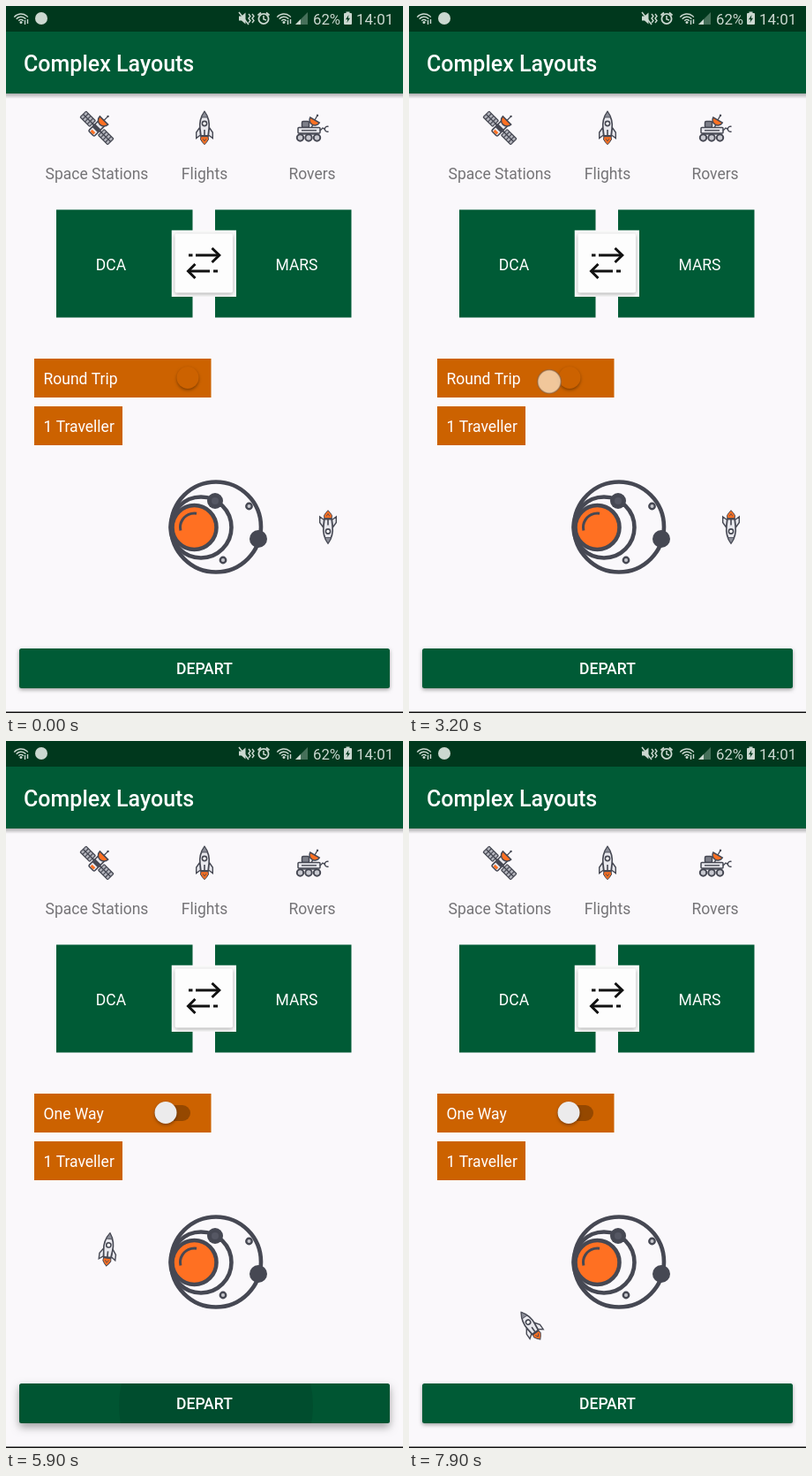
These frames come from a looping animation (450x800 px, 8000 ms). An HTML page with a canvas:

```html
<!DOCTYPE html>
<html lang="en">
<head>
<meta charset="utf-8">
<title>Complex Layouts</title>
<style>
html, body { margin: 0; width: 100%; height: 100%; overflow: hidden; background: #faf8fb; }
canvas { display: block; width: 100vw; height: 100vh; }
</style>
</head>
<body>
<canvas id="stage"></canvas>
<script>
const W = 450, H = 800, LOOP = 8000, STEP = 100;
const BG = '#faf8fb', GREEN = '#005b36', ORANGE = '#cc6200';
const INK = '#464853', FIRE = '#ff7022', PALE = '#e9e9ee', STATUS = '#cbd8d0';
const FONT = 'Roboto, sans-serif';

const canvas = document.getElementById('stage');
const g = canvas.getContext('2d');
let scale = 1;

// Each trip: button down, launch time, duration, start angle and sweep in degrees.
const trips = [
  { press: 490, go: 656, dur: 1967, from: 0, sweep: 360 },
  { press: 4170, go: 4246, dur: 1000, from: 0, sweep: 180 },
  { press: 5780, go: 5864, dur: 1000, from: 180, sweep: 180 },
  { press: 6970, go: 7096, dur: 1000, from: 0, sweep: 180 }
];
// Finger and thumb while the switch is dragged.
const drag = [
  { x: 212, y: 428, thumb: 206 },
  { x: 188, y: 427, thumb: 186 },
  { x: 159, y: 425, thumb: 182 }
];
const DRAG_START = 3000, DRAG_END = 3300;

const clamp = v => Math.max(0, Math.min(1, v));
const mix = (a, b, k) => `rgb(${a.map((v, i) => Math.round(v + (b[i] - v) * k)).join(',')})`;

function rect(x, y, w, h, color, r = 0) {
  g.fillStyle = color;
  g.beginPath();
  g.roundRect(x, y, w, h, r);
  g.fill();
}

function line(color, width, ...pts) {
  g.strokeStyle = color;
  g.lineWidth = width;
  g.beginPath();
  for (let i = 0; i < pts.length; i += 2) g.lineTo(pts[i], pts[i + 1]);
  g.stroke();
}

function disc(x, y, r, fill, stroke, width) {
  g.beginPath();
  g.arc(x, y, r, 0, Math.PI * 2);
  if (fill) { g.fillStyle = fill; g.fill(); }
  if (stroke) { g.strokeStyle = stroke; g.lineWidth = width; g.stroke(); }
}

function shape(d, fill, width) {
  const p = new Path2D(d);
  if (fill) { g.fillStyle = fill; g.fill(p); }
  if (width) { g.strokeStyle = INK; g.lineWidth = width; g.stroke(p); }
}

function text(str, x, y, size, color, align = 'left', weight = 400) {
  g.font = `${weight} ${size}px ${FONT}`;
  g.textAlign = align;
  g.fillStyle = color;
  g.fillText(str, x, y);
}

function at(x, y, deg, draw) {
  g.save();
  g.translate(x, y);
  g.rotate(deg * Math.PI / 180);
  draw();
  g.restore();
}

function shadowed(dy, blur, alpha, draw) {
  g.save();
  g.shadowColor = `rgba(0,0,0,${alpha})`;
  g.shadowOffsetY = dy * scale;
  g.shadowBlur = blur * scale;
  draw();
  g.restore();
}

function rocket(x, y, deg) {
  at(x, y, deg, () => {
    shape('M-4 9 L-4.5 13 L-2.5 16 L0 18.8 L2.5 16 L4.5 13 L4 9Z', FIRE, 1);
    shape('M-2 12 L0 15 L2 12', null, 0.8);
    shape('M-5 -1 L-9.3 5 L-9.3 11.5 L-4.5 8Z M5 -1 L9.3 5 L9.3 11.5 L4.5 8Z', PALE, 1.4);
    shape('M0 -18.5 C-4 -13 -6 -6 -5 1 L-4 9.5 H4 L5 1 C6 -6 4 -13 0 -18.5Z', PALE, 1.6);
    shape('M0 -18.5 C-1.6 -16 -2.7 -14 -3.5 -12 H3.5 C2.7 -14 1.6 -16 0 -18.5Z', '#8b8d97', 0.8);
    disc(0, -5, 2.6, '#fff', INK, 1.6);
    line(INK, 1.6, 0, 2, 0, 9);
    line(INK, 2, -4, 9, 4, 9);
  });
}

function dish(x, y, deg, r) {
  at(x, y, deg, () => {
    line(INK, 1.3, 0, 0, 0, -r);
    shape(`M${-r} 0 A${r} ${r} 0 0 0 ${r} 0Z`, FIRE, 1.5);
    disc(0, -r, 1.2, INK);
  });
}

function satellite() {
  at(103, 138, 45, () => {
    for (const x of [-22, 7]) {
      rect(x, -4.7, 15, 9.4, '#b4b5bd');
      for (let i = 0; i <= 4; i++) line(INK, 1.2, x + i * 3.75, -4.7, x + i * 3.75, 4.7);
      for (let i = -1; i <= 1; i++) line(INK, 1.3, x, i * 4.7, x + 15, i * 4.7);
    }
    line(INK, 2, -8, 0, 8, 0);
    rect(-4.5, -8, 9, 17, PALE, 1.5);
    g.strokeStyle = INK;
    g.lineWidth = 1.6;
    g.stroke();
    rect(-4.5, -2, 9, 5, INK);
    rect(-2.5, 5, 5, 3, FIRE);
  });
  dish(111, 129.5, 45, 6.5);
}

function rover() {
  line(INK, 1.5, 346, 138, 349, 132);
  dish(350, 129, 30, 6);
  rect(335.5, 130.5, 8, 7, '#7d7f89', 1.5);
  g.strokeStyle = INK;
  g.lineWidth = 1.5;
  g.stroke();
  rect(331, 137.5, 25, 6.5, PALE, 1);
  g.stroke();
  line(INK, 1.4, 335, 140.8, 352, 140.8);
  line(INK, 1.4, 356, 141, 359, 138, 362, 139.5);
  shape('M365.5 136.5 A3 3 0 1 0 365.5 142', null, 1.4);
  for (const x of [333.5, 343, 352.5]) disc(x, 149, 3.7, '#c9cad1', INK, 2);
  line(INK, 1.4, 333, 145, 353, 145);
}

function wifi(x) {
  for (const r of [3.5, 6.8, 10]) {
    g.strokeStyle = STATUS;
    g.lineWidth = 1.5;
    g.beginPath();
    g.arc(x, 19, r, -Math.PI * 0.78, -Math.PI * 0.22);
    g.stroke();
  }
  disc(x, 18.6, 1.5, STATUS);
  line(STATUS, 1.4, x + 4.5, 16, x + 4.5, 21);
  line(STATUS, 1.4, x + 7.5, 15, x + 7.5, 20);
}

function statusBar() {
  rect(0, 0, W, 29, '#00381d');
  wifi(17);
  disc(40, 14, 7, STATUS);

  shape('M264 11.5 H267 L271.5 7.5 V20.5 L267 16.5 H264Z', STATUS);
  line(STATUS, 1.5, 264, 7, 275, 21);
  line(STATUS, 1.4, 275, 9, 277, 11.5, 275, 14, 277, 16.5, 275, 19);
  line(STATUS, 1.4, 279, 9, 281, 11.5, 279, 14, 281, 16.5, 279, 19);

  disc(292, 14.5, 5.6, null, STATUS, 1.8);
  line(STATUS, 1.5, 292, 11, 292, 15, 295, 16);
  line(STATUS, 1.8, 285.5, 10.5, 289, 7.5);
  line(STATUS, 1.8, 295, 7.5, 298.5, 10.5);

  wifi(315);
  shape('M328 21 H342 V7Z', '#46705a');
  shape('M328 21 H334 V15Z', STATUS);
  text('62%', 348, 20.5, 16.8, STATUS);
  rect(385.5, 6.5, 4, 2, STATUS);
  rect(383, 8, 9, 13, STATUS, 1);
  shape('M388.5 10 L385 15.3 H387.3 L386.3 19 L390 13.7 H387.7Z', '#00381d');
  text('14:01', 397, 20.5, 17, STATUS);
}

function header() {
  const fade = g.createLinearGradient(0, 99, 0, 105);
  fade.addColorStop(0, 'rgba(0,0,0,0.3)');
  fade.addColorStop(1, 'rgba(0,0,0,0)');
  rect(0, 99, W, 6, fade);
  rect(0, 29, W, 70, GREEN);
  statusBar();
  text('Complex Layouts', 20, 74, 25, '#fff', 'left', 500);
}

function tabs() {
  satellite();
  rocket(225, 138, 0);
  rover();
  ['Space Stations', 'Flights', 'Rovers'].forEach((name, i) =>
    text(name, 103 + i * 122, 195.5, 17.5, '#757477', 'center'));
}

function route() {
  rect(57, 230.5, 154.5, 122, GREEN);
  rect(237, 230.5, 154.5, 122, GREEN);
  text('DCA', 119, 298.5, 17.5, '#fff', 'center');
  text('MARS', 329.5, 298.5, 17.5, '#fff', 'center');

  g.save();
  g.beginPath();
  g.rect(187.5, 253.5, 73.5, 75.5);
  g.clip();
  rect(187.5, 253.5, 73.5, 75.5, '#fafafa');
  shadowed(1.5, 4, 0.3, () => rect(191.5, 257.5, 65.5, 67, '#fdfdfd', 2));
  g.restore();

  const black = '#111';
  line(black, 3, 207, 282, 211.5, 282);
  line(black, 3, 215, 282, 241, 282);
  line(black, 3, 233.5, 274, 241.8, 282, 233.5, 290);
  line(black, 3, 207, 300, 231, 300);
  line(black, 3, 235, 300, 240, 300);
  line(black, 3, 214.5, 292, 206.5, 300, 214.5, 308);
}

function touch(x, y) {
  disc(x, y, 13.2, 'rgba(255,238,215,0.72)', 'rgba(120,95,80,0.5)', 1.6);
}

function options(t) {
  const off = t >= DRAG_END;
  const k = clamp((t - 3250) / 250);
  const finger = t >= DRAG_START && !off ? drag[(t - DRAG_START) / STEP] : null;
  const thumb = off ? 181 : finger ? finger.thumb : 206;

  rect(32, 399, 200.5, 44, ORANGE);
  rect(32, 453, 100, 44, ORANGE);
  text(off ? 'One Way' : 'Round Trip', 42.5, 428, 17.5, '#fff');
  text('1 Traveller', 42.5, 482, 17.5, '#fff');

  rect(168, 412, 41, 18, `rgba(0,0,0,${0.27 * k})`, 9);
  shadowed(1.6, 3.5, 0.36, () =>
    disc(thumb, 420.5, 12.5, mix([204, 98, 0], [236, 235, 236], k)));
  if (finger) touch(finger.x, finger.y);
}

function planet() {
  disc(238, 589.5, 51, null, INK, 4.6);
  disc(221, 590, 34.5, null, INK, 4.6);
  disc(213.5, 590, 25, FIRE, INK, 4.6);
  g.lineWidth = 3;
  g.beginPath();
  g.arc(213.5, 590, 16, Math.PI * 0.93, Math.PI * 1.55);
  g.stroke();
  disc(237, 560, 9, INK);
  disc(237, 560, 4, '#555763');
  disc(286, 603, 10, INK);
  disc(275.5, 566, 3.2, '#c5c5cb', INK, 2.4);
  disc(246, 627, 3.2, '#c5c5cb', INK, 2.4);
}

function orbit(t) {
  const trip = trips.filter(p => t >= p.go).pop();
  const deg = trip ? trip.from + trip.sweep * clamp((t - trip.go) / trip.dur) : 0;
  const a = deg * Math.PI / 180;
  rocket(240 + 125 * Math.cos(a), 589.5 + 125 * Math.sin(a), deg + 180);
}

function departButton(t) {
  const tap = trips.filter(p => t >= p.press).pop();
  let lift = 0, glow = 0, spread = 0;
  if (tap) {
    lift = clamp((t - tap.press) / 100) * clamp(1 - (t - tap.go) / 100);
    glow = clamp(1 - (t - tap.go) / 350);
    spread = clamp((t - tap.press) / 300);
  }
  shadowed(1.8 + 4 * lift, 4 + 8 * lift, 0.36, () => rect(15, 727, 420, 45, GREEN, 2.5));
  if (glow) {
    g.save();
    g.beginPath();
    g.roundRect(15, 727, 420, 45, 2.5);
    g.clip();
    rect(15, 727, 420, 45, `rgba(0,0,0,${0.08 * glow})`);
    disc(238, 752, 30 + 200 * spread, `rgba(0,0,0,${0.1 * glow})`);
    g.restore();
  }
  text('DEPART', 225, 756, 17.5, '#fff', 'center', 500);
  if (tap && t < tap.go) touch(238, 752);
}

function draw(t) {
  rect(0, 0, W, H, BG);
  header();
  tabs();
  route();
  options(t);
  planet();
  orbit(t);
  departButton(t);
  rect(0, 798.5, W, 1.5, '#111');
}

function resize() {
  const dpr = window.devicePixelRatio || 1;
  canvas.width = Math.round(innerWidth * dpr);
  canvas.height = Math.round(innerHeight * dpr);
  scale = canvas.width / W;
  g.setTransform(scale, 0, 0, canvas.height / H, 0, 0);
}

const origin = performance.now();
function tick() {
  const t = (performance.now() - origin) % LOOP;
  draw(Math.floor(t / STEP) * STEP);
  requestAnimationFrame(tick);
}

addEventListener('resize', resize);
resize();
tick();
</script>
</body>
</html>
```
